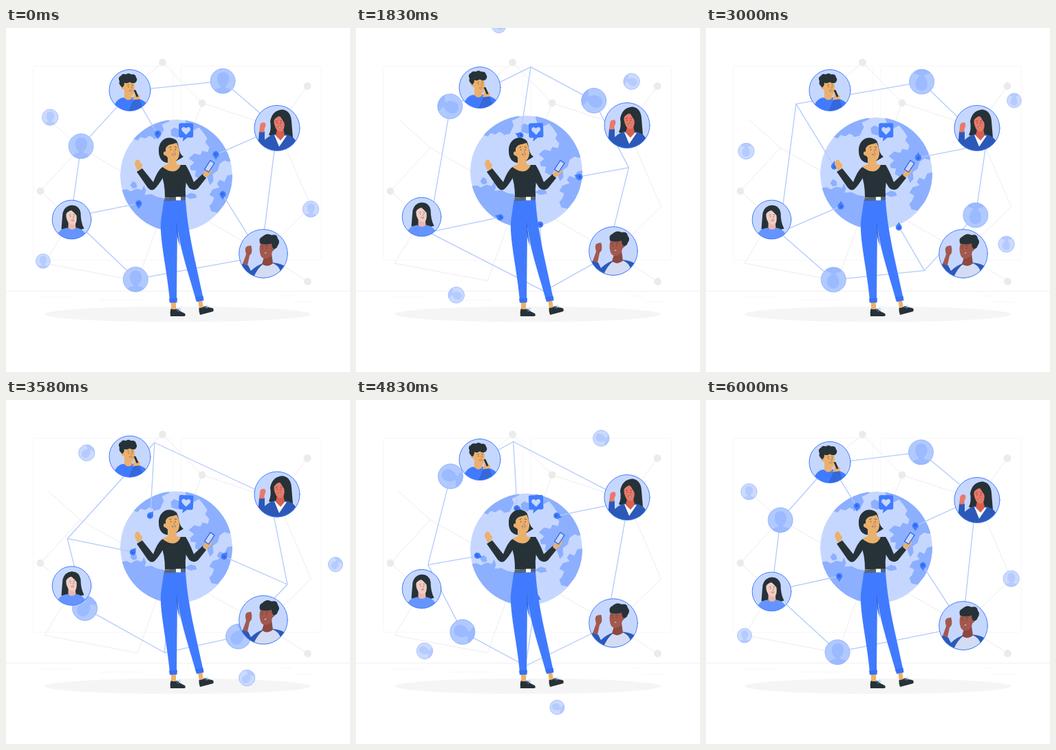
Recreate the animation shown at these times as an HTML page. Size 500x500 px, loop 6.04 s.

```html
<!DOCTYPE html>
<html lang="en">
<head>
<meta charset="utf-8">
<title>Connected world</title>
<style>
html, body { margin: 0; width: 100%; height: 100%; overflow: hidden; background: #fff; }
svg { display: block; width: 100vw; height: 100vh; }
.ink { fill: #263238; }
.blue { fill: #407bff; }
.navy { fill: #2c59b8; }
.pale { fill: #c6d7ff; }
.skin { fill: #ebb06d; }
.line { fill: none; stroke-linecap: round; stroke-linejoin: round; }
</style>
</head>
<body>
<svg viewBox="0 0 500 500">
  <defs>
    <clipPath id="world"><circle r="81.5"/></clipPath>
    <clipPath id="unit"><circle r="1"/></clipPath>
    <clipPath id="c30"><circle r="30"/></clipPath>
    <clipPath id="c28"><circle r="28.3"/></clipPath>
    <clipPath id="c33"><circle r="33"/></clipPath>
    <clipPath id="c35"><circle r="35.3"/></clipPath>
    <g id="face" class="line" stroke="#263238" stroke-width=".7">
      <path d="M-2.500-2.500v1.400M4.500-2.500v1.400M-4.500-5l2.500-1M3.500-6l2.500 .8"/>
      <path d="M2-1.500l1.500 4-1.500 .4" stroke="#a8602f" stroke-width=".5"/>
      <path d="M-.5 5.500Q2.500 6.500 4.500 4.500Q4.500 8 2 7.500Q.3 7.200-.5 5.500Z" fill="#fff" stroke="#7c3030" stroke-width=".6"/>
    </g>
  </defs>

  <!-- backdrop -->
  <g class="line" stroke="#f7f7f7">
    <rect x="39.500" y="55.500" width="203" height="282" rx="3"/>
    <rect x="254" y="55.500" width="204" height="282" rx="3"/>
    <path d="M0 382.500H500" stroke="#f0f0f0"/>
    <path d="M53 391H82M86 391H98M136 395.500H197M401 389.500H416M418 398.500H448"/>
    <path stroke="#ededed" d="M62 133L108 174L50 237L95 278L56 342L191 367.500L285 109L227.500 50L180 90M108 174L374 327L438.500 368.500M285 109L394 145L438 84.500M394 145L443.500 260L374 327"/>
  </g>
  <g fill="#ebebeb" id="dots"></g>
  <ellipse cx="249.500" cy="416" rx="193.500" ry="11.300" fill="#f5f5f5"/>

  <g id="globe">
    <g clip-path="url(#world)">
      <circle r="81.500" class="pale"/>
      <g fill="#8cafff">
        <path d="M-70-49L-62-53-56-51-52-56-45-54-39-58-33-55-27-61-22-60-18-67-21-74-10-79-12-86-50-80-74-60Z"/>
        <path d="M-35-62l9-3 5 4-3 6-9 2zM-8-66l5-4 7 3 3 7-5 5-9-3z"/>
        <path d="M12-84L16-70 26-66 33-70 39-63 45-54 42-48 48-41 46-34 38-36 35-30 26-32 18-25 26-19 20-13 29-9 27 1 36 6 42-3 45 3 49 14 54 8 53-2 60-7 63-17 70-22 76-20 90-24 80-60 40-90Z"/>
        <path d="M20-14l10-4 6 5-6 6-9-1z"/>
        <path d="M84-2L74 0 70 9 63 6 59 12 63 17 53 20 48 28 55 32 52 40 48 44 51 52 60 54 68 44 75 42 84 30Z"/>
        <path d="M12 30l9-5 7 2 2 5-9 2z"/>
        <path d="M-86 22L-72 20-66 23-58 19-50 21-47 14-44 22-46 28-36 27-28 31-18 33-8 44-3 55 3 65 5 90-45 86-86 50Z"/>
        <path d="M-67 14l4-6 5 3 1 6-6 2z"/>
      </g>
    </g>
  </g>

  <g id="bubble">
    <path class="blue" d="M-8-11H8Q10.500-11 10.500-8.500V7Q10.500 10 8 10H2L-5 15.500-4 10H-8Q-10.500 10-10.500 7V-8.500Q-10.500-11-8-11Z"/>
    <path class="pale" d="M0 6L-5.500 .5C-8.500-3-4.500-8 0-3.500C4.500-8 8.500-3 5.500 .5Z"/>
  </g>

  <g id="net">
    <path class="line" stroke="#b3cafc" stroke-width="1.300" d="M183 91L109 172L94.500 275L189 365L371 332L394 145L315 77ZL220 154M94.500 275L193 255M394 145L305 184M371 332L315 242"/>
  </g>

  <!-- portraits -->
  <g class="portrait" data-x="180" data-y="90.500">
    <circle r="30" class="pale"/>
    <g clip-path="url(#c30)">
      <path class="blue" d="M-25 32Q-23 15-12 11L2 10Q16 11 26 20L22 34Z"/>
      <path class="skin" d="M-8 1L-8 11Q-3 17 3 12L2 0Z"/>
      <path class="skin" d="M-10-12Q-3-16 6-12Q9 3 4 8Q-2 9-6 4L-9-1Q-13-1-13-6Q-12-9-10-8Z"/>
      <path class="ink" d="M-11-4Q-17-9-15-13Q-18-19-13-21Q-11-25-6-23Q-2-26 2-23Q8-24 9-19Q12-15 8-11Q3-9 0-12Q-4-9-8-11Q-8-6-11-4Z"/>
      <use href="#face" transform="translate(0 -3.500) scale(.75)"/>
      <path class="skin" d="M4 14L7 5 10 4 15 9 13 16Z"/>
      <path class="ink" d="M5.500 0l3-.6 4 9.500-2.600 1z"/>
      <path fill="#3468db" d="M-2 30L5 14 14 13 19 27 8 33Z"/>
    </g>
    <circle r="30" class="line" stroke="#407bff"/>
  </g>

  <g class="portrait" data-x="95.500" data-y="278.500">
    <circle r="28.300" class="pale"/>
    <g clip-path="url(#c28)">
      <path class="ink" d="M-15 14Q-14 0-13-10Q-10-20 0-21Q11-21 13-10Q13 4 18 13Q8 17-15 14Z"/>
      <path d="M-22 24Q-18 13-7 12H8Q17 14 22 24L8 34H-10Z" fill="#6594ff"/>
      <path d="M-5 3V12Q0 17 6 12L5 2Z" fill="#e9b9af"/>
      <path d="M-8-10Q0-16 6-12Q9 2 5 7Q0 9-5 4Q-9-2-8-10Z" fill="#f3cdc3"/>
      <path class="ink" d="M-10-4Q-8-11-1-14Q3-11 8-5Q9-16 0-18Q-11-17-10-4Z"/>
      <use href="#face" transform="translate(0 -3) scale(.7)"/>
    </g>
    <circle r="28.300" class="line" stroke="#407bff"/>
  </g>

  <g class="portrait" data-x="394" data-y="145.500">
    <circle r="33" class="pale"/>
    <g clip-path="url(#c33)">
      <path class="ink" d="M-12 10Q-8 2-10-10Q-7-26 8-27Q20-25 21-10Q22 2 23 14L8 17Z"/>
      <path class="navy" d="M-28 28L-26 5H-18L-18 17Q-10 10-4 9L12 9Q23 11 27 18L20 34H-20Z"/>
      <path d="M-4 10L3 27 14 11Z" fill="#fff"/>
      <path d="M0 2L-2 11 5 18 11 11 9 0Z" fill="#d5604f"/>
      <path d="M-4-15Q4-20 9-14Q13-2 8 4Q3 7-1 2Q-6-7-4-15Z" fill="#e8796a"/>
      <path class="ink" d="M-6-8Q-4-15 4-18Q7-13 13-4Q16-19 6-22Q-6-22-6-8Z"/>
      <use href="#face" transform="translate(2 -6) scale(.8)"/>
      <path d="M-26 6L-25-2Q-25-9-18-8Q-15-5-18 0L-19 6Z" fill="#e8796a"/>
    </g>
    <circle r="33" class="line" stroke="#407bff"/>
  </g>

  <g class="portrait" data-x="374" data-y="328">
    <circle r="35.300" class="pale"/>
    <g clip-path="url(#c35)">
      <path class="navy" d="M-38 26L-29 13-22 17-18 25Q-10 17 0 14L14 13Q28 14 36 22L24 38H-24Z"/>
      <path d="M-16 38Q-8 20 0 15L14 14Q24 18 25 27L18 38Z" fill="#d3dcf2"/>
      <path d="M1 5L-2 15Q6 21 14 14L12 0Z" fill="#8c4940"/>
      <path d="M-4-15Q6-22 15-16Q21-8 13-3Q12 6 4 7Q-2 8-4 2Q-7-7-4-15Z" fill="#a3594d"/>
      <path class="ink" d="M-5-15Q-7-23-1-25Q5-31 12-27Q20-29 21-22Q25-17 21-12Q20-7 15-7Q12-10 12-15Q4-12-5-15Z"/>
      <use href="#face" transform="translate(1 -6.500) scale(.85)"/>
      <path d="M-30 15L-25 1Q-28-10-23-11L-18-12Q-16-8-17-1L-20 3-23 17Z" fill="#a3594d"/>
    </g>
    <circle r="35.300" class="line" stroke="#407bff"/>
  </g>

  <!-- main figure -->
  <g>
    <path class="skin" d="M240 396h7v13h-7zM279 396l6-1 2 11-6 2z"/>
    <path class="ink" d="M239.500 408Q244 410 249 408Q254 413 260 415Q262 418 259 419H239Q238 413 239.500 408ZM280.500 407Q286 407 289 404Q295 407 300 407Q303 409 301 412L282 417Q280 412 280.500 407Z"/>
    <path class="line" stroke="#8cafff" d="M248 410l5-3M250 412l4-3M289 406l4-3M291 407l4-2"/>
    <path class="blue" d="M229.500 250H261C263 280 268 306 273 330L286.500 392 276 395C264 352 253 322 249 287L248 395 238 396C234 350 222 303 225.500 278Z"/>
    <path d="M248 281L249 287Q250 300 253 317Q247 304 248 281Z" fill="#2e61d8"/>
    <path d="M237 393.500L249 392.500 248.500 399 238 399.500ZM275 391.500L286.500 389.500 287.500 396 277 398Z" fill="#3570f5"/>
    <path class="ink" d="M226 203Q234 199 241 199H252L261 199Q266 208 262 222Q260 234 261 246H231Q231 224 225 212Z"/>
    <path class="ink" d="M226 203Q220 208 214 224L198 204 190 209 206 232Q211 238 216 234Q222 228 229 216ZM261 199Q266 206 273 224L286 212 291 218 279 233Q272 238 266 232L260 222Z"/>
    <path class="skin" d="M191 207L187 198Q187 193 191 191Q195 192 195 196L198 198Q198 203 196 205ZM286 214L290 206Q293 203 298 206L300 207Q297 213 290 217Z"/>
    <path d="M288.500 205.500L297 192.500 303 196.500 294.500 209.500Z" fill="#c6d7ff" stroke="#2e61d8" stroke-width="1.300" stroke-linejoin="round"/>
    <path fill="#5b6468" d="M230.500 246.500L261 245V250L230.500 251.500Z"/>
    <path fill="#fff" d="M247 245.500h7v5h-7z"/>
    <path fill="#2e61d8" d="M239 246h1.500v5.500h-1.500zM259 245h1.500v5h-1.500z"/>
    <path class="ink" d="M222 179C221 163 235 155 246 162C253 168 249 181 258 187C251 192 243 196 236 196C228 196 222 190 222 179Z"/>
    <path class="skin" d="M227 201.500L235 198V188H247L248 198 254 199.500Q250 208 243 208.500Q234 208 227 201.500Z"/>
    <path class="skin" d="M232 175Q235 168 248 167Q252 174 252 183Q251 193 244 193Q236 191 233 186Q228 185 229 181Q230 178 232 180Z"/>
    <path class="ink" d="M230 180Q231 170 240 169Q246 168 249 165Q243 159 233 163Q224 168 226 181Z"/>
    <use href="#face" transform="translate(242 178.500) scale(.95)"/>
  </g>
</svg>
<script>
const $ = id => document.getElementById(id);
const add = (id, html) => $(id).insertAdjacentHTML('beforeend', html);
const move = (el, x, y, turn = 0) => el.setAttribute('transform', `translate(${x} ${y}) rotate(${turn})`);

for (const [x, y] of [[227.5, 50], [285, 109], [438, 84.5], [50, 237], [438.5, 368.5]])
  add('dots', `<circle cx="${x}" cy="${y}" r="5.400"/>`);

// Faint member: disc with a bust, drawn in a unit circle
function member(x, y, r, disc, bust, rim) {
  add('net', `<g transform="translate(${x} ${y}) scale(${r})">
    <circle r="1" fill="${disc}"/>
    <path clip-path="url(#unit)" fill="${bust}" d="M-.45-.2C-.5-.85.5-.9.5-.2C.5.1.4.25.22.4V.55Q.7.6.8 1H-.8Q-.7.6-.2.55V.4C-.4.25-.45.1-.45-.2Z"/>
    <circle r="1" fill="none" stroke="${rim}" stroke-width="${.8 / r}"/></g>`);
}
for (const [x, y] of [[315, 77], [109, 172], [188.5, 365.5]]) member(x, y, 18, '#b0c9ff', '#9bbaff', '#8aaeff');
for (const [x, y, r] of [[64, 130, 11.7], [443, 263, 11.7], [54, 339, 10.5]]) member(x, y, r, '#cbdafd', '#b5cbff', '#a1beff');

for (const [x, y] of [[220.5, 153.5], [305, 183.5], [315, 241.5], [193, 255]])
  add('net', `<g transform="translate(${x} ${y})"><path class="blue" d="M0 8.500C-1 4-4.500 4-4.500 0A4.500 4.500 0 0 1 4.500 0C4.500 4 1 4 0 8.500Z"/><circle cx="-.3" cy="-.3" r="1.700" fill="#3062d8"/></g>`);

const portraits = [...document.querySelectorAll('.portrait')];
const LOOP = 6040, TURN = 6000, CX = 250.6, CY = 221.6;

function draw(now) {
  const t = now % LOOP, a = t / TURN * 2 * Math.PI;
  const spin = Math.min(t * .0601, 359);
  $('net').setAttribute('transform', `rotate(${spin} ${CX} ${CY})`);
  move($('globe'), 247.5, 213 + 1.5 * Math.cos(a) - 4 * Math.sin(a));
  move($('bubble'), 261.7, 149.3, 3 * Math.sin(2 * a));
  const lift = 4.75 * (1 - Math.cos(4 * a));
  for (const p of portraits) move(p, p.dataset.x, p.dataset.y - lift);
}

const start = performance.now();
function tick() {
  draw(performance.now() - start);
  requestAnimationFrame(tick);
}
tick();
</script>
</body>
</html>
```
